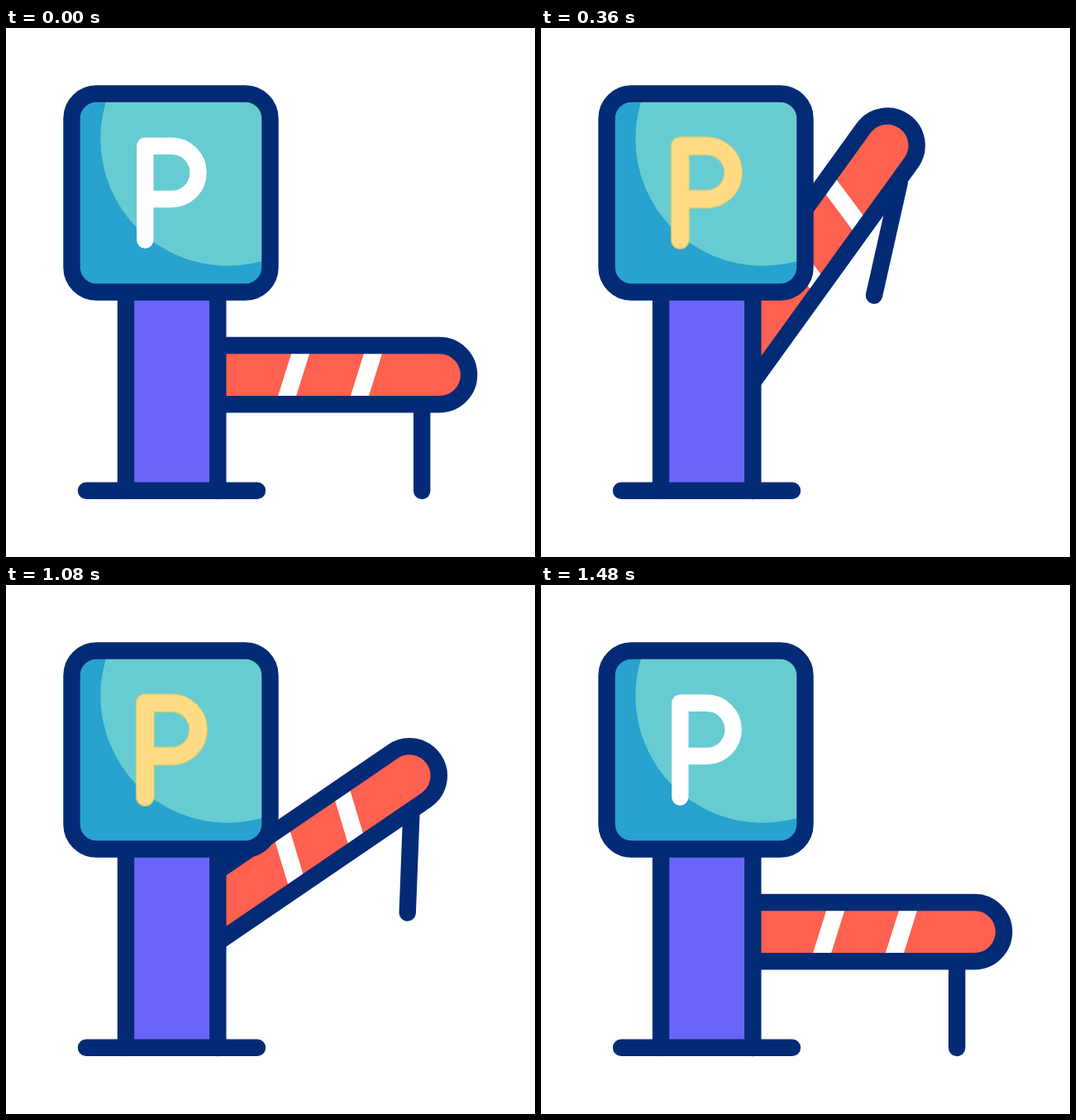
An HTML page that plays this animation: 640 px wide and 640 px high, repeating every 2 s.

```html
<!DOCTYPE html>
<html lang="en">
<head>
<meta charset="utf-8">
<title>Parking barrier</title>
<style>
  html, body { margin: 0; width: 100%; height: 100%; overflow: hidden; background: #fff; }
  svg { display: block; width: 100%; height: 100%; }
  .line { fill: none; stroke: #032b75; stroke-width: 20.4; stroke-linecap: round; stroke-linejoin: round; }
  .butt { stroke-linecap: butt; }
  .letter { stroke: #fff; }
  .glow { stroke: #ffce50; stroke-width: 23; }
</style>
</head>
<body>
<svg viewBox="0 0 640 640">
  <defs>
    <clipPath id="panel"><rect x="79.5" y="79.5" width="240" height="240" rx="30"/></clipPath>
    <path id="p" d="M168.3 256.6V142.8H200.5a32.1 32.1 0 0 1 0 64.2H168.3"/>
  </defs>

  <g id="arm">
    <path id="leg" class="line" d="M0 -35V105"/>
    <path fill="#ff6150" d="M170 384H524.5a35.6 35.6 0 0 1 0 71.2H170z"/>
    <path fill="#fff" d="M345.5 393h22l-17 54h-22zM433.3 393h22l-17 54h-22z"/>
    <path class="line butt" d="M170 384H524.5a35.6 35.6 0 0 1 0 71.2H170"/>
  </g>

  <path fill="#6a65f8" d="M145 320H256V560H145z"/>
  <path class="line" d="M145 320V560M256.3 320V560M97 559.8H304"/>

  <g clip-path="url(#panel)">
    <path fill="#28a2ce" d="M70 70H330V330H70z"/>
    <circle cx="268" cy="134" r="153.7" fill="#67ccd1"/>
  </g>
  <rect class="line" x="79.5" y="79.5" width="240" height="240" rx="30"/>
  <use href="#p" class="line letter"/>
  <use href="#p" class="line glow" id="glow"/>
</svg>
<script>
  const LOOP = 2000, STEP = 40;
  const arm = document.getElementById('arm');
  const leg = document.getElementById('leg');
  const glow = document.getElementById('glow');

  // Easing curve with flat ends: control points (x1, 0) and (x2, 1).
  const ease = (x1, x2) => u => {
    let lo = 0, hi = 1;
    for (let i = 0; i < 30; i++) {
      const s = (lo + hi) / 2, r = 1 - s;
      if (3 * x1 * s * r * r + 3 * x2 * s * s * r + s * s * s < u) lo = s; else hi = s;
    }
    return lo * lo * (3 - 2 * lo);
  };
  const linear = u => u;
  const swing = ease(.267, .426);

  // Each key: [time, value, easing towards this key]
  const tracks = {
    lift: [[80, 0], [383, 54.5, swing], [600, 44.28, swing], [960, 44.28, linear], [1480, 0, swing]],
    hang: [[80, 0], [340, 67.5, swing], [600, 43.6, swing], [960, 43.6, linear], [1480, 0, ease(.35, .45)]],
    drop: [[170, 0], [380, 42.5, ease(.4, .5)], [600, 29.4, swing], [960, 29.4, linear], [1260, 0, ease(.38, .64)]],
    glow: [[80, 0], [480, 1, linear], [960, 1, linear], [1360, 0, linear]]
  };

  function valueAt(keys, t) {
    const i = keys.findIndex(key => key[0] > t);
    if (i === 0) return keys[0][1];
    if (i < 0) return keys[keys.length - 1][1];
    const [t0, v0] = keys[i - 1], [t1, v1, curve] = keys[i];
    return v0 + (v1 - v0) * curve((t - t0) / (t1 - t0));
  }

  function draw(now) {
    const t = Math.floor(now % LOOP / STEP) * STEP;
    const at = name => valueAt(tracks[name], t);
    arm.setAttribute('transform', `rotate(${-at('lift')} 200.5 384)`);
    leg.setAttribute('transform', `translate(503.2 455) rotate(${at('hang')}) translate(0 ${at('drop')})`);
    glow.setAttribute('opacity', at('glow'));
  }

  const start = performance.now();
  function tick() {
    draw(performance.now() - start);
    requestAnimationFrame(tick);
  }
  tick();
</script>
</body>
</html>
```
